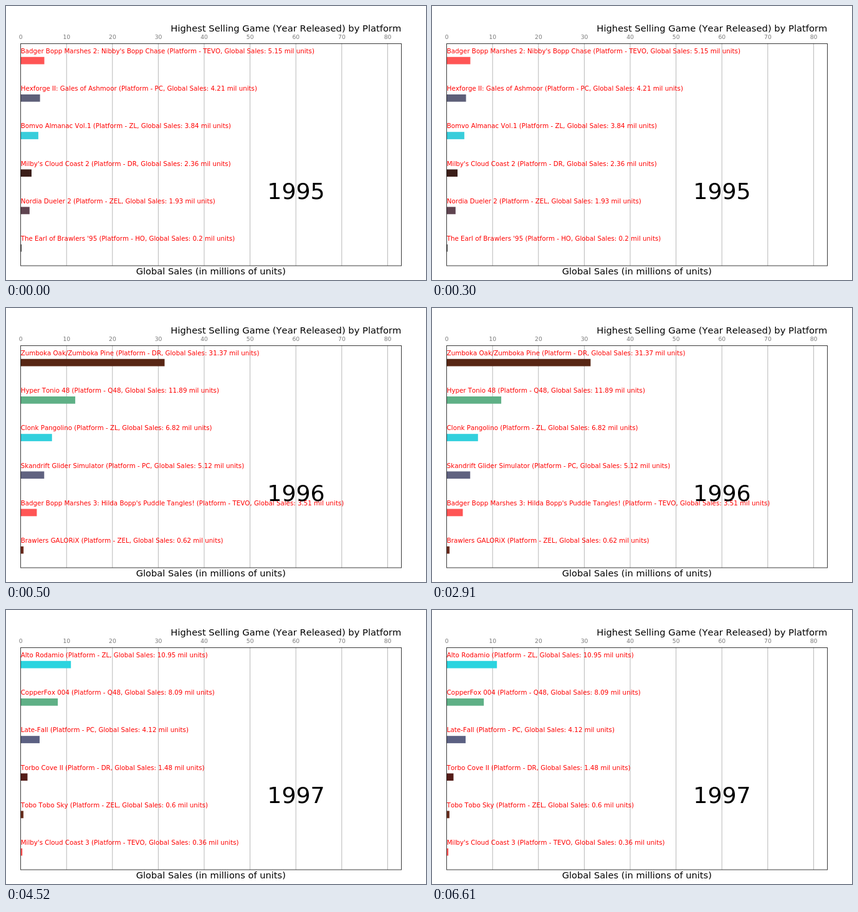
These frames come from a looping animation (674x440 px, 8 s). An HTML page with a canvas:

```html
<!DOCTYPE html>
<html lang="en">
<head>
<meta charset="utf-8">
<title>Highest Selling Game by Platform</title>
<style>
  html, body { margin: 0; width: 100%; height: 100%; overflow: hidden; background: #fff; }
  canvas { display: block; }
</style>
</head>
<body>
<canvas id="stage" width="674" height="440"></canvas>
<script>
const ctx = document.getElementById('stage').getContext('2d');
const LOOP = 8000;
const LEFT = 23.6, UNIT = 7.36, ROW = 60.2;

// Each row: title, platform, sales in millions, bar colour
const years = [
  { start: 0, year: '1995', rows: [
    ["Badger Bopp Marshes 2: Nibby's Bopp Chase", 'TEVO', 5.15, '#ff5555'],
    ['Hexforge II: Gales of Ashmoor', 'PC', 4.21, '#5d5f78'],
    ['Bomvo Almanac Vol.1', 'ZL', 3.84, '#38cddb'],
    ["Milby's Cloud Coast 2", 'DR', 2.36, '#3b1e18'],
    ['Nordia Dueler 2', 'ZEL', 1.93, '#5f4450'],
    ["The Earl of Brawlers '95", 'HO', 0.2, '#555555']
  ] },
  { start: 500, year: '1996', rows: [
    ['Zumboka Oak/Zumboka Pine', 'DR', 31.37, '#582614'],
    ['Hyper Tonio 48', 'Q48', 11.89, '#5fb086'],
    ['Clonk Pangolino', 'ZL', 6.82, '#32d0dd'],
    ['Skandrift Glider Simulator', 'PC', 5.12, '#606280'],
    ["Badger Bopp Marshes 3: Hilda Bopp's Puddle Tangles!", 'TEVO', 3.51, '#ff5555'],
    ['Brawlers GALORiX', 'ZEL', 0.62, '#6a2a1c']
  ] },
  { start: 4520, year: '1997', rows: [
    ['Alto Rodamio', 'ZL', 10.95, '#2bd4df'],
    ['CopperFox 004', 'Q48', 8.09, '#5fb086'],
    ['Late-Fall', 'PC', 4.12, '#5b6082'],
    ['Torbo Cove II', 'DR', 1.48, '#541c18'],
    ['Tobo Tobo Sky', 'ZEL', 0.6, '#6a3020'],
    ["Milby's Cloud Coast 3", 'TEVO', 0.36, '#ff5555']
  ] }
];

function text(str, x, y, size, color, align) {
  ctx.font = size + 'px "DejaVu Sans", sans-serif';
  ctx.fontKerning = 'none';
  ctx.fillStyle = color;
  ctx.textAlign = align;
  ctx.fillText(str, x, y);
}

function drawGrid() {
  for (let v = 0; v <= 80; v += 10) {
    const x = LEFT + v * UNIT;
    ctx.fillStyle = '#b8b8b8';
    if (v) ctx.fillRect(x - 0.5, 60, 1, 357);
    text(String(v), x + 0.1, 53, 9.2, '#777', 'center');
  }
}

function drawRow([title, platform, sales, color], i) {
  const y = i * ROW;
  ctx.fillStyle = color;
  ctx.fillRect(LEFT, 81.8 + y, sales * UNIT, 11.7);
  const label = `${title} (Platform - ${platform}, Global Sales: ${sales} mil units)`;
  text(label, 23.7, Math.round(76 + y), 10.27, '#f00', 'left');
}

function draw(time) {
  const scene = years.filter(s => s.start <= time).pop();
  ctx.fillStyle = '#fff';
  ctx.fillRect(0, 0, 674, 440);
  drawGrid();
  scene.rows.forEach(drawRow);
  ctx.strokeStyle = 'rgba(0, 0, 0, 0.77)';
  ctx.lineWidth = 1;
  ctx.strokeRect(23.5, 60.5, 611, 356.6);
  text('Highest Selling Game (Year Released) by Platform', 634.4, 41, 14.72, '#000', 'right');
  text('Global Sales (in millions of units)', 328.8, 431, 14.65, '#000', 'center');
  text(scene.year, 465.5, 309.5, 36.3, '#000', 'center');
}

const begin = performance.now();
function tick() {
  draw((performance.now() - begin) % LOOP);
  requestAnimationFrame(tick);
}
tick();
</script>
</body>
</html>
```
